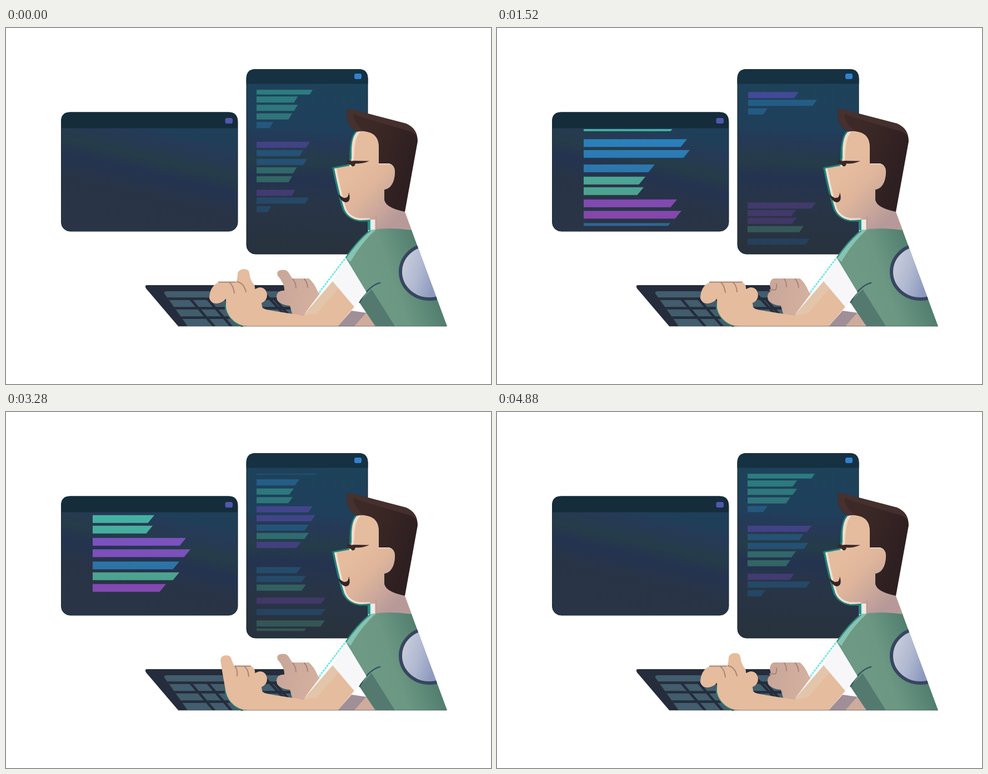
An HTML page that plays this animation: 873x641 px, repeating every 4960 ms.

```html
<!DOCTYPE html>
<html lang="en">
<head>
<meta charset="utf-8">
<title>Typing at the desk</title>
<style>
html, body { margin: 0; width: 100%; height: 100%; overflow: hidden; background: #fff; }
svg { display: block; width: 873px; height: 641px; }
.knuckle { fill: none; stroke: #a98474; stroke-width: 2; stroke-linecap: round; }
</style>
</head>
<body>
<svg viewBox="0 0 873 641">
  <defs id="defs">
    <linearGradient id="wide" gradientUnits="userSpaceOnUse" x1="285" y1="178" x2="240" y2="366">
      <stop offset="0" stop-color="#1f3f59"/><stop offset=".14" stop-color="#263a56"/>
      <stop offset=".32" stop-color="#253c49"/><stop offset=".46" stop-color="#243350"/>
      <stop offset=".66" stop-color="#283446"/><stop offset="1" stop-color="#293546"/>
    </linearGradient>
    <linearGradient id="tall" gradientUnits="userSpaceOnUse" x1="550" y1="100" x2="535" y2="407">
      <stop offset="0" stop-color="#1e425a"/><stop offset=".27" stop-color="#1f3f5b"/>
      <stop offset=".35" stop-color="#263956"/><stop offset=".46" stop-color="#253c49"/>
      <stop offset=".56" stop-color="#243350"/><stop offset=".7" stop-color="#283547"/>
      <stop offset="1" stop-color="#28323d"/>
    </linearGradient>
    <linearGradient id="skin" gradientUnits="userSpaceOnUse" x1="630" y1="255" x2="712" y2="335">
      <stop offset="0" stop-color="#e5bc9d"/><stop offset=".35" stop-color="#dfb69b"/>
      <stop offset=".62" stop-color="#cfab9b"/><stop offset="1" stop-color="#b7999a"/>
    </linearGradient>
    <linearGradient id="farHand" gradientUnits="userSpaceOnUse" x1="490" y1="480" x2="560" y2="490">
      <stop offset="0" stop-color="#c9a799"/><stop offset="1" stop-color="#d4b09f"/>
    </linearGradient>
    <linearGradient id="shirt" gradientUnits="userSpaceOnUse" x1="650" y1="450" x2="765" y2="410">
      <stop offset="0" stop-color="#6d9985"/><stop offset=".35" stop-color="#6c9783"/>
      <stop offset=".65" stop-color="#5d8a78"/><stop offset="1" stop-color="#4a7768"/>
    </linearGradient>
    <linearGradient id="badge" gradientUnits="userSpaceOnUse" x1="713" y1="430" x2="775" y2="450">
      <stop offset="0" stop-color="#c6cbdb"/><stop offset=".5" stop-color="#b0b8d0"/>
      <stop offset="1" stop-color="#8d99bf"/>
    </linearGradient>
    <linearGradient id="hair" gradientUnits="userSpaceOnUse" x1="640" y1="190" x2="735" y2="220">
      <stop offset="0" stop-color="#3d2a28"/><stop offset=".5" stop-color="#372524"/>
      <stop offset="1" stop-color="#2e1f21"/>
    </linearGradient>
    <clipPath id="wideView"><rect x="150" y="182" width="260" height="174.3"/></clipPath>
    <clipPath id="tallView"><rect x="445" y="111.3" width="180" height="283"/></clipPath>
    <clipPath id="shirtClip"><path id="shirtShape" d="M655 364Q690 358 730 364L794 537H665L636 494L649 476L611 413Q634 380 655 364Z"/></clipPath>
    <clipPath id="faceClip"><path id="faceShape" d="M632 187Q652 182 663 192Q671 201 671 215V245H690Q701 247 700 262Q698 288 681 291V310Q684 324 718 331L731 366H655V345L637 346Q616 343 609 326Q599 295 591 253L618 248Q623 240 622 225Q622 195 632 187Z"/></clipPath>
    <clipPath id="keyClip"><path d="M289 474H505L545 537H327L285 478Q284 474 289 474Z"/></clipPath>
  </defs>

  <!-- screens -->
  <rect x="99.5" y="152" width="317.5" height="214" rx="16" fill="url(#wide)" stroke="#1b2a3a"/>
  <path d="M99 180.500V168Q99 151.500 115 151.500H401Q417 151.500 417 168V180.500Z" fill="#152c3b"/>
  <rect x="394.500" y="162" width="13.500" height="10" rx="3" fill="#5058ae"/>
  <g id="wideBars" clip-path="url(#wideView)"></g>

  <rect x="433" y="74.500" width="218" height="332.500" rx="16" fill="url(#tall)" stroke="#16222e"/>
  <path d="M432.500 100.500V90Q433 74 449 74H635Q651 74 651.500 90V100.500Z" fill="#153142"/>
  <rect x="627" y="82" width="13" height="10" rx="3" fill="#3181cf"/>
  <g id="tallBars" clip-path="url(#tallView)"></g>

  <!-- keyboard -->
  <path d="M254 463H520L545 537H310L252 469Q249 463 254 463Z" fill="#252c3b"/>
  <g clip-path="url(#keyClip)">
    <rect x="280" y="470" width="270" height="70" fill="#425d6d"/>
    <path d="M280 487.500H550M280 504.500H550M280 521.500H550M331 487L377 540M362 487L408 540M394 487L440 540M432 487L478 540M462 474L516 532M482 487L530 540" fill="none" stroke="#252c3b" stroke-width="4.500"/>
  </g>

  <!-- far hand -->
  <g id="farPoses" fill="url(#farHand)">
    <path d="M511 451H545Q553 456 562 476L565 478L535 518H516L511 500Q495 499 489 491Q485 484 489 477Q494 472 503 473L500 458Z"/>
    <g data-pose="R">
      <path d="M498 451H518L512 474H491Q494 468 491 464Q491 453 498 451Z"/>
      <path class="knuckle" d="M491 471.500H501Q504 469 503 461M517 452Q521 457 521 466M537 452Q542 458 543 467"/>
    </g>
    <g data-pose="P">
      <path d="M489 446Q486 438 494 436Q505 434 509 441L516 452L512 476L501 474Q502 460 489 446Z"/>
      <path class="knuckle" d="M516 452Q521 457 522 468M537 452Q542 458 543 467"/>
    </g>
    <g data-pose="Q">
      <path d="M512 437Q514 432 523 432Q531 432 532 439L537 452L520 474H491L490 466Q499 454 513 449Z"/>
      <path class="knuckle" d="M492 471H502Q509 468 507 456M519 457Q522 463 521 471M537 452Q542 458 543 467"/>
    </g>
  </g>

  <!-- head -->
  <path d="M632 187Q622 195 621 225Q622 240 617 248L590 253Q598 295 608 326Q616 343 637 346H654V364" fill="none" stroke="#1f827c" stroke-width="5"/>
  <use href="#faceShape" fill="url(#skin)"/>
  <g clip-path="url(#faceClip)" fill="none">
    <path d="M634 184Q623 195 622 225Q622 240 617 248" stroke="#efdcc8" stroke-width="10"/>
    <path d="M591 250Q599 295 609 326Q616 343 637 346H655" stroke="#efe1cf" stroke-width="7"/>
    <path d="M659 345V366" stroke="#f0ebe4" stroke-width="11"/>
    <path d="M655 345V366" stroke="#57c9c0" stroke-width="3"/>
    <path d="M666 339V366" stroke="#b99a94" stroke-width="2"/>
  </g>
  <path d="M613 150Q613 145 620 146L720 172Q741 181 741 204L718 331Q684 324 681 310V291Q698 288 700 262Q701 247 690 244H671V215Q671 191 650 187Q640 184 630 186Q613 178 613 150Z" fill="url(#hair)"/>
  <path d="M614 149Q615 145 621 146L720 172Q737 179 740 196Q733 186 720 184L655 165L625 155Q627 172 642 185H630Q613 178 614 149Z" fill="#4a3330" opacity=".75"/>
  <path d="M612 233Q617 241 626 239L654 239.500Q641 245 629 244Q628 250 623 249Q619 244 612 244Q617 240 612 233Z" fill="#3a2827"/>
  <path d="M597 299Q603 303 608 306Q617 307 617 296Q622 312 612 314Q603 313 597 299Z" fill="#352325"/>

  <!-- far arm and shirt -->
  <path d="M597 537L622 509L650 513L628 537Z" fill="#a08f97"/>
  <path d="M627 537L649 512L667 537Z" fill="#ceab9b"/>
  <use href="#shirtShape" fill="url(#shirt)"/>
  <g clip-path="url(#shirtClip)">
    <path d="M636 494L658 470L700 537H660Z" fill="#547a70"/>
    <path d="M611 413Q634 380 655 364L667 362Q640 386 620 421Z" fill="#86c3b1"/>
    <path d="M611 413Q634 380 655 364" fill="none" stroke="#2c8a80" stroke-width="4"/>
    <ellipse cx="762" cy="439" rx="52" ry="49" fill="url(#badge)" stroke="#37465f" stroke-width="6"/>
  </g>
  <path d="M636 495Q652 464 674 458.500" fill="none" stroke="#2d4d5e" stroke-width="2.200"/>

  <!-- near arm -->
  <g id="nearPoses" fill="#e5bc9d">
    <path d="M396 496V506Q404 528 426 537" fill="none" stroke="#2a7c70" stroke-width="4"/>
    <path d="M396 490V503C398 520 415 537 436 537H597L627 502L588 456L535 518L474 508Q462 506 461 502L460 495Q470 491 470 480Q468 467 456 467L448 470Q449 458 436 457H410L394 476Z"/>
    <path d="M535 518L588 456L599 468L560 514Z" fill="#e3c9b0" opacity=".8"/>
    <path data-pose="RAC" d="M412 457H384Q366 465 366 487Q370 497 380 496Q390 495 396 487L410 494Z"/>
    <g data-pose="R"><path class="knuckle" d="M383 457.500H441M403 458Q409 463 411 476M425 458Q431 463 432 475"/></g>
    <g data-pose="A">
      <path d="M413 461Q417 453 417 441Q420 434 429 434Q438 435 438 441Q439 453 447 463L430 470Z"/>
      <path class="knuckle" d="M383 457.500H413M402 458Q409 463 411 477M416 457Q428 459 432 475"/>
    </g>
    <g data-pose="B">
      <path d="M396 506L390 472L386 447Q386 439 396 438Q405 438 406 446L411 458L420 490Z"/>
      <path class="knuckle" d="M412 457.500H440M412 458Q417 463 416 475M429 458Q436 463 437 476"/>
    </g>
    <g data-pose="C">
      <path d="M390 459V445Q392 437 402 437Q412 438 413 446Q414 454 424 459L408 472Z"/>
      <path class="knuckle" d="M383 457.500H398Q408 463 410 475M418 457.500H441M425 458Q431 463 432 475"/>
    </g>
  </g>
  <path d="M611 414L649 476L627 502L588 456Z" fill="#f7f7f9"/>
  <path d="M564 476L611 414" stroke="#5be8e2" stroke-width="2.500" stroke-dasharray="4 1.500"/>
  <path d="M310 537H794" stroke="#3d4a4c" stroke-width="1" opacity=".65"/>
</svg>
<script>
const LOOP = 4960, STEP = 80;
const NS = 'http://www.w3.org/2000/svg';
const byId = id => document.getElementById(id);

function add(parent, tag, attrs) {
  const el = document.createElementNS(NS, tag);
  for (const key in attrs) el.setAttribute(key, attrs[key]);
  return parent.appendChild(el);
}

// Bar colours drift with the height on the screen.
function tint(id, y1, y2, from, to) {
  const g = add(byId('defs'), 'linearGradient', { id, gradientUnits: 'userSpaceOnUse', x1: 0, x2: 0, y1, y2 });
  add(g, 'stop', { offset: 0, 'stop-color': from });
  add(g, 'stop', { offset: 1, 'stop-color': to });
}
tint('wP', 182, 356, '#7757c8', '#8545aa');
tint('wG', 182, 356, '#44b3a5', '#539985');
tint('wB', 182, 356, '#2a83c0', '#2f6692');
tint('tP', 111, 394, '#434a9a', '#40345c');
tint('tG', 111, 394, '#2d7c81', '#355453');
tint('tB', 111, 394, '#245f89', '#263f58');

// Each bar reads as colour, top, right end.
function makeBars(host, prefix, left, height, slant, rows) {
  return rows.split(',').map(row => {
    const [top, right] = row.slice(1).split(' ').map(Number);
    const el = add(byId(host), 'polygon', { fill: `url(#${prefix}${row[0]})` });
    return { el, left, top, width: right - left, height, slant };
  });
}

const wide = makeBars('wideBars', 'w', 156, 14, 11.5,
  'P179 299,G198 324,B226.5 342,B246 347,B272 284,G294 267,G313 264,P335 324,P355.5 332,' +
  'B377.5 312,G397 312,P418 288,B476 288,B497 303');
const intro = makeBars('tallBars', 't', 452, 11, 8,
  'B112 571,G128 547,G144 536,P168.5 543,B182.5 576,B198 487');
const listing = makeBars('tallBars', 't', 451, 11, 8,
  'P207.5 574,P221 538,P235 539,G250 552,B272.5 563,B288 566,B308 528,G324.5 518,G340 516,' +
  'P356.5 552,P372.5 557,B389.5 545,G404.5 545,P420.5 531,B466 531,B482 540,G497.5 540,' +
  'P521 575,B541.5 575,G562 574,G576.5 540,G591.5 540,G607 528,B622.5 487,' +
  'P658 566,B673 552,B689 560,G704 538,G720 528,P744.5 535,B758.5 564,B774 483');

function place(bars, shift, scale) {
  for (const { el, left, top, width, height, slant } of bars) {
    const y = top + shift, end = left + width * scale, foot = left + (width - slant) * scale;
    el.style.display = scale > 0 ? '' : 'none';
    el.setAttribute('points', `${left},${y} ${end},${y} ${foot},${y + height} ${left},${y + height}`);
  }
}

const ramp = (t, from, to) => Math.min(1, Math.max(0, (t - from) / (to - from)));

// Finger poses, one per 160 ms.
const nearKeys = 'ARCRARBRCRARBRBRCRARBRCRBRCBRRA';
const farKeys = 'PRQRRPQRPRRQRRPRQRRRPRQRRPRRQRR';
const poseParts = id => [...byId(id).querySelectorAll('[data-pose]')];
const near = poseParts('nearPoses'), far = poseParts('farPoses');

function pose(parts, key) {
  for (const el of parts) el.style.display = el.dataset.pose.includes(key) ? '' : 'none';
}

function draw(t) {
  const wideScroll = (960 - Math.max(t, 880)) * 0.0467;
  place(wide, wideScroll, ramp(t, 80, 560) - ramp(t, 4320, 4800));

  place(intro, -Math.max(0, t - 1200) / 6, ramp(t, 560, 1040));

  // The listing folds away across the loop point.
  const tail = t < 480 ? t + LOOP : t;
  place(listing, (2160 - Math.min(tail, 4880)) / 6, 1 - ramp(tail, 4880, 5360));

  const beat = Math.floor(t / 160);
  pose(near, nearKeys[beat]);
  pose(far, farKeys[beat]);
}

const start = performance.now();
function tick() {
  const t = (performance.now() - start) % LOOP;
  draw(Math.floor(t / STEP) * STEP);
  requestAnimationFrame(tick);
}
tick();
</script>
</body>
</html>
```
